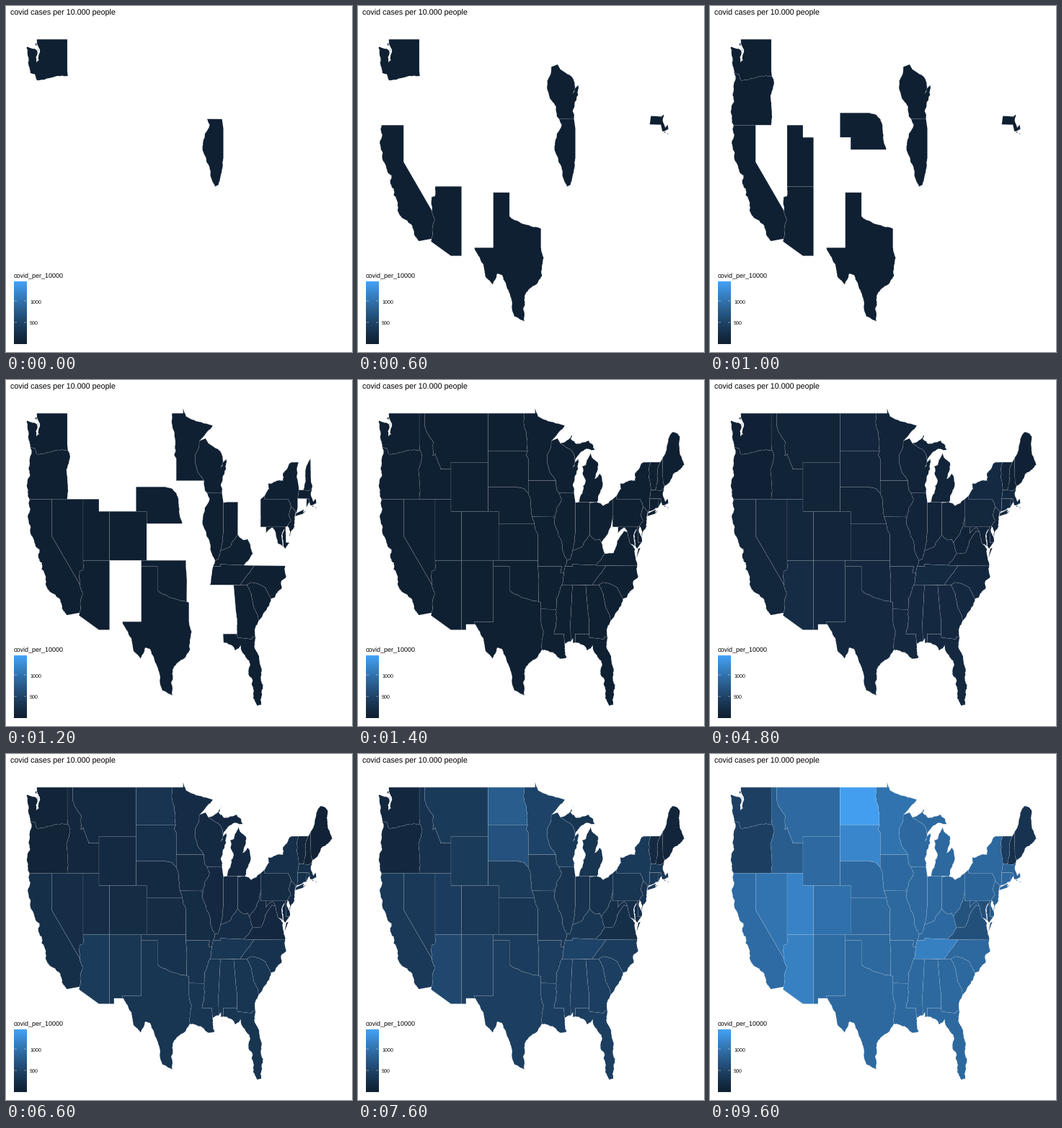
Write a matplotlib script that moves like this. It is 480 px wide and 480 px high and loops after 10000 ms.

```python
import numpy as np
import matplotlib.pyplot as plt
from matplotlib.animation import FuncAnimation
from matplotlib.collections import PolyCollection
from matplotlib.colors import LinearSegmentedColormap

SIZE, FRAMES, STEP = 480, 100, 100
TOP_VALUE = 1457
PX = 0.72  # points per pixel at 100 dpi

rng = np.random.default_rng(4)
ramp = LinearSegmentedColormap.from_list("blues", ["#102033", "#44a2f5"], gamma=1.2)


# ---- outlines -------------------------------------------------------------

def line(*v):
    """Degrees west and north in pairs -> pixel path."""
    p = np.array(v, float).reshape(-1, 2)
    return np.column_stack((944.1 - 7.34 * p[:, 0], 46.2 + 17 * (49 - p[:, 1])))


def split(a, b, bend):
    """Midpoint displacement between two points, without the first one."""
    d = b - a
    if np.hypot(*d) < 2.6:
        return [b]
    mid = (a + b) / 2 + np.array((-d[1], d[0])) * rng.uniform(-bend, bend)
    return split(a, mid, bend) + split(mid, b, bend)


def river(*v, bend=0.08):
    p = line(*v)
    return np.array([p[0]] + [q for a, b in zip(p, p[1:]) for q in split(a, b, bend)])


def coast(*v):
    return river(*v, bend=0.14)


def box(west, east, south, north):
    return line(west, north, east, north, east, south, west, south)


def gap(a, b):
    return np.hypot(*(a - b))


def ring(first, *rest):
    """Chain paths end to end, turning each one the right way round."""
    if rest:
        ends = rest[0][0], rest[0][-1]
        if min(gap(first[0], e) for e in ends) < min(gap(first[-1], e) for e in ends):
            first = first[::-1]
    parts = [first]
    for p in rest:
        tip = parts[-1][-1]
        parts.append(p[::-1] if gap(p[-1], tip) < gap(p[0], tip) else p)
    return np.vstack(parts)


polys, owner, starts, centers = [], [], [], []


def state(start, *paths, extra=()):
    outline = ring(*paths)
    for p in (outline, *extra):
        polys.append(p)
        owner.append(len(starts))
    starts.append(start)
    centers.append((outline.min(0) + outline.max(0)) / 2)


# Pacific and mountains
wa_sea = coast(122.76, 49, 122.5, 48.4, 122.2, 48, 122.4, 47.3, 122.9, 47.1, 122.65, 47.9,
               122.8, 48.12, 124.7, 48.38, 124.35, 47.4, 124.05, 46.27)
wa_or = river(124.05, 46.27, 123.2, 46.15, 122.75, 45.65, 121.5, 45.7, 119.6, 45.92, 118.98, 46, 116.92, 46)
or_id = river(116.92, 46, 116.5, 45.5, 117.2, 44.4, 117.03, 43.8, 117.03, 42)
or_sea = coast(124.05, 46.27, 124.1, 44, 124.55, 42.84, 124.2, 42)
ca_sea = coast(124.2, 42, 124.15, 41, 124.4, 40.4, 123.75, 39, 122.95, 38.1, 122.3, 37.9, 122.5, 37.2,
               121.85, 36.8, 121.9, 36.3, 120.65, 34.6, 119.3, 34.2, 118.4, 33.8, 117.12, 32.53)
ca_az = river(114.72, 32.72, 114.6, 33.4, 114.15, 34.3, 114.63, 35)
nv_az = river(114.63, 35, 114.75, 36.1, 114.05, 36.2, 114.05, 37)
id_mt = river(116.05, 48, 114.35, 46.65, 114.5, 45.55, 113.95, 45.7, 113, 44.45, 111.05, 44.47)
# Plains
nd_mn = river(97.23, 49, 96.85, 47.5, 96.56, 45.94)
sd_mn = line(96.56, 45.94, 96.85, 45.6, 96.45, 45.3, 96.45, 43.5)
sd_ne = river(96.45, 42.5, 97.2, 42.85, 98.5, 43)
ia_ne = river(96.45, 42.5, 95.85, 41.2, 95.77, 40.58)
ne_mo = river(95.77, 40.58, 95.3, 40)
ks_mo = line(95.3, 40, 95.1, 39.5, 94.6, 39.1, 94.62, 37)
red = river(94.48, 33.64, 96.6, 33.85, 98.1, 34.1, 100, 34.56)
ok_ar = line(94.62, 36.5, 94.43, 35.4, 94.48, 33.64)
sabine = river(94.04, 32, 93.55, 31.2, 93.85, 29.7)
tx_sea = coast(93.85, 29.7, 95.3, 28.9, 97.2, 27.75, 97.4, 27, 97.15, 25.96)
rio = river(97.15, 25.96, 99.1, 26.4, 99.5, 27.5, 100.7, 29.1, 101.4, 29.77, 102.3, 29.88, 103.2, 28.98,
            104.5, 29.6, 104.9, 30.6, 106.53, 31.78)
# Lakes and the Mississippi
mn_top = river(95.15, 49.38, 94.6, 48.75, 92, 48.3, 89.55, 48, 92.1, 46.75)
mn_wi = river(92.1, 46.75, 92.3, 46.1, 92.87, 45.6, 92.75, 44.75, 91.22, 43.5)
ia_wi = river(91.22, 43.5, 91.05, 42.7, 90.64, 42.5)
ia_il = river(90.64, 42.5, 90.15, 42, 91.05, 41.3, 91.42, 40.38)
ia_mo = line(91.42, 40.38, 91.72, 40.6, 95.77, 40.58)
il_mo = river(91.42, 40.38, 91.5, 40, 90.7, 38.95, 90.2, 38.6, 89.5, 37.3, 89.13, 36.98)
ky_mo = river(89.13, 36.98, 89.5, 36.5)
tn_mo = river(89.5, 36.5, 89.7, 36)
mo_ar = line(89.7, 36, 90.37, 36, 90.1, 36.5, 94.62, 36.5)
ar_tn = river(89.7, 36, 90.1, 35)
ar_ms = river(90.1, 35, 91.1, 33.9, 91.17, 33)
la_ms = river(91.17, 33, 91.1, 32.2, 91.6, 31)
wi_mi = river(90.4, 46.57, 88.1, 45.9, 87.6, 45.1)
wi_lake = coast(87.6, 45.1, 88, 44.55, 87, 45.3, 87.7, 43.7, 87.8, 42.49)
mi_up = coast(90.4, 46.57, 87.8, 47.47, 88.4, 46.9, 87.4, 46.5, 85, 46.77, 83.9, 46, 86.3, 45.9, 87.6, 45.1)
mi_low = coast(83.45, 41.73, 82.42, 43, 83, 44.07, 83.9, 43.65, 83.3, 45, 84.75, 45.77, 85.55, 44.8,
               86.25, 44.7, 86.2, 42.5, 86.82, 41.76)
# Ohio valley and the South
il_in = river(88.05, 37.8, 87.53, 39.3)
il_ky = river(89.13, 36.98, 88.5, 37.1, 88.05, 37.8)
in_ky = river(88.05, 37.8, 86.3, 38.1, 85.4, 38.73, 84.82, 39.1)
oh_ky = river(84.82, 39.1, 83.7, 38.65, 82.9, 38.75, 82.6, 38.42)
oh_wv = river(80.52, 40.64, 80.85, 39.7, 81.75, 38.95, 82.6, 38.42)
oh_lake = coast(83.45, 41.73, 82.3, 41.45, 80.52, 41.98)
ky_wv = river(82.6, 38.42, 81.97, 37.54)
ky_va = river(81.97, 37.54, 83.68, 36.6)
tn_top = line(89.5, 36.5, 88.05, 36.5, 88.05, 36.68, 83.68, 36.6)
tn_nc = river(81.7, 36.58, 83.1, 35.75, 84.32, 34.99)
wv_va = river(77.72, 39.32, 78.35, 39.4, 79.65, 38.58, 80.3, 37.6, 81.97, 37.54)
potomac = river(79.48, 39.2, 78.3, 39.68, 77.72, 39.32)
md_va = river(77.28, 38.4, 77.72, 39.32)
va_sea = coast(75.87, 36.55, 76.3, 37.5, 76.25, 37.9, 77.28, 38.4)
md_sea = coast(75.05, 38.45, 75.85, 37.95, 76.25, 38.5, 76, 39.55, 76.5, 38.9, 76.35, 38.1, 77.28, 38.4)
nc_sea = coast(75.87, 36.55, 75.7, 35.6, 76.6, 35.3, 76.5, 34.7, 77.9, 33.95, 78.55, 33.86)
nc_sc = line(83.1, 35, 82.3, 35.2, 81.05, 35.1, 79.67, 34.8, 78.55, 33.86)
sc_sea = coast(78.55, 33.86, 79.3, 33.1, 80.9, 32.05)
ga_sc = river(83.1, 35, 81.95, 33.45, 80.9, 32.05)
ga_sea = coast(80.9, 32.05, 81.45, 30.7)
ga_fl = line(85, 31, 84.86, 30.7, 82.2, 30.57, 82, 30.75, 81.45, 30.7)
al_ga = river(85.18, 32.87, 85, 32.3, 85, 31)
al_fl = line(85, 31, 87.6, 31, 87.5, 30.3)
al_ms = line(88.2, 35, 88.1, 34.9, 88.47, 31.9, 88.4, 30.37)
al_sea = line(87.5, 30.3, 88, 30.25, 88, 30.65, 88.4, 30.37)
fl_sea = coast(81.45, 30.7, 80.55, 28.45, 80.03, 26.8, 80.4, 25.2, 81.1, 25.13, 81.9, 26.5, 82.8, 27.9,
               82.65, 28.8, 84.2, 30.1, 85.3, 29.65, 87.5, 30.3)
ms_sea = coast(88.4, 30.37, 89.55, 30.2)
la_sea = coast(89.55, 30.2, 89.5, 29.7, 89.2, 29.05, 90.9, 29.1, 91.8, 29.5, 93.85, 29.7)
# Northeast
ny_lake = coast(79.76, 42.27, 78.9, 42.85, 79.05, 43.27, 76.3, 43.5, 76.3, 44.1, 74.7, 45)
ny_vt = river(73.34, 45.01, 73.27, 42.75)
ny_ct = line(73.5, 42.05, 73.5, 41.3, 73.65, 41)
ny_nj = line(74, 40.7, 73.9, 41, 74.7, 41.36)
ny_pa = river(75.35, 42, 74.7, 41.36)
nj_pa = river(74.7, 41.36, 75.2, 40.7, 74.75, 40.2, 75.4, 39.8)
nj_sea = coast(74, 40.7, 74.1, 39.75, 74.95, 38.95, 75.4, 39.8)
de_sea = coast(75.4, 39.8, 75.55, 39.4, 75.05, 38.45)
ct_ri = line(71.8, 42.02, 71.85, 41.32)
ct_sea = coast(71.85, 41.32, 73.65, 41)
ma_ri = line(71.38, 42.02, 71.12, 41.5)
ri_sea = line(71.12, 41.5, 71.35, 41.75, 71.85, 41.32)
ma_sea = coast(70.82, 42.87, 71, 42.3, 70.5, 41.78, 70.1, 42.05, 69.97, 41.65, 71.12, 41.5)
vt_nh = river(71.5, 45.01, 72.05, 44.1, 72.46, 42.73)
nh_me = line(71.08, 45.3, 70.98, 43.4, 70.7, 43.07)
me_top = river(71.08, 45.3, 70.3, 46.2, 69.23, 47.46, 68.3, 47.36, 67.79, 47.07, 67.79, 45.7, 66.97, 44.8)
me_sea = coast(66.97, 44.8, 69.1, 44, 70.7, 43.07)

# Second of first appearance, then the outline
state(0, wa_sea, wa_or, line(117.04, 46.42, 117.04, 49),
      extra=[line(123.15, 48.6, 122.85, 48.7, 122.85, 48.45), line(122.7, 48.3, 122.4, 47.95, 122.6, 48.1)])
state(0, ia_il, il_mo, il_ky, il_in, line(87.53, 41.7, 87.8, 42.49))
state(.2, ca_sea, ca_az, line(120, 39, 120, 42))
state(.2, ca_az, nv_az, line(109.05, 37, 109.05, 31.33, 111.07, 31.33, 114.82, 32.5))
state(.4, line(73.27, 42.75, 71.3, 42.7, 70.82, 42.87), ma_sea, ma_ri, line(73.5, 42.05),
      extra=[line(70.8, 41.4, 70.6, 41.47, 70.45, 41.36), line(70.2, 41.3, 70, 41.33, 70, 41.24)])
state(.4, mn_wi, ia_wi, wi_lake, wi_mi, line(90.9, 46.95))
state(.6, line(103.05, 36.5, 100, 36.5), red, line(94.04, 33.55, 94.04, 32), sabine, tx_sea, rio,
      line(106.62, 32, 103.05, 32))
state(.8, line(104.05, 43, 98.5, 43), sd_ne, ia_ne, ne_mo, line(102.05, 40, 102.05, 41, 104.05, 41))
state(1, line(114.05, 42, 111.05, 42, 111.05, 41, 109.05, 41, 109.05, 37, 114.05, 37))
state(1, wa_or, or_id, or_sea)
state(1.2, line(120, 42, 114.05, 42), nv_az, line(120, 39))
state(1.2, box(109.05, 102.05, 37, 41))
state(1.2, line(103.05, 37, 94.62, 37), ok_ar, red, line(100, 36.5, 103.05, 36.5))
state(1.2, line(97.23, 49, 95.15, 49), mn_top, mn_wi, sd_mn, nd_mn)
state(1.2, il_in, line(87.53, 41.7, 86.82, 41.76, 84.8, 41.76), in_ky)
state(1.2, il_ky, in_ky, oh_ky, ky_wv, ky_va, tn_top, ky_mo)
state(1.2, tn_top, tn_nc, line(90.1, 35), ar_tn, tn_mo)
state(1.2, tn_nc, nc_sc, nc_sea)
state(1.2, nc_sc, sc_sea, ga_sc)
state(1.2, line(85.6, 34.98, 83.1, 35), ga_sc, ga_sea, ga_fl, al_ga)
state(1.2, al_fl, ga_fl, fl_sea)
state(1.2, ny_lake, ny_vt, line(73.5, 42.05), ny_ct, ny_nj, ny_pa, line(79.76, 42),
      extra=[line(74, 40.6, 73.75, 40.85, 72.3, 41.15, 72.5, 40.9, 71.9, 41.07, 72.5, 40.8)])
state(1.2, line(80.52, 41.98, 79.76, 42.27, 79.76, 42, 75.35, 42), ny_pa, nj_pa,
      line(75.79, 39.72, 80.52, 39.72))
state(1.2, ny_nj, nj_pa, nj_sea)
state(1.2, potomac, line(79.48, 39.72, 75.79, 39.72, 75.7, 38.46, 75.05, 38.45), md_sea, md_va)
state(1.2, vt_nh, line(71.3, 42.7, 70.82, 42.87), nh_me)
state(1.2, ma_ri, ri_sea, ct_ri)
state(1.4, line(117.04, 49, 116.05, 49), id_mt, line(111.05, 42), or_id, line(117.04, 46.42))
state(1.4, line(104.05, 49, 116.05, 49), id_mt, line(111.05, 45, 104.05, 45))
state(1.4, box(111.05, 104.05, 41, 45))
state(1.4, line(104.05, 45.94, 104.05, 49, 97.23, 49), nd_mn)
state(1.4, line(104.05, 43, 104.05, 45.94, 96.56, 45.94), sd_mn, sd_ne)
state(1.4, line(102.05, 37, 102.05, 40, 95.3, 40), ks_mo)
state(1.4, line(96.45, 43.5, 91.22, 43.5), ia_wi, ia_il, ia_mo, ia_ne)
state(1.4, ia_mo, il_mo, ky_mo, tn_mo, mo_ar, ks_mo, ne_mo)
state(1.4, mo_ar, ok_ar, line(94.04, 33.55, 94.04, 33.02, 91.17, 33), ar_ms, ar_tn)
state(1.4, line(94.04, 32, 94.04, 33.02, 91.17, 33), la_ms, line(89.75, 31), la_sea, sabine)
state(1.4, ar_ms, la_ms, line(89.75, 31), ms_sea, al_ms)
state(1.4, line(88.2, 35, 85.6, 34.98), al_ga, al_fl, al_sea, al_ms)
state(1.4, line(86.82, 41.76, 84.8, 41.76, 83.45, 41.73), mi_low, extra=[ring(wi_mi, mi_up)])
state(1.4, line(84.8, 41.7, 83.45, 41.73), oh_lake, oh_wv, oh_ky)
state(1.4, wv_va, ky_va, line(81.7, 36.58, 75.87, 36.55), va_sea, md_va,
      extra=[line(75.25, 38.03, 75.65, 37.95, 76, 37.2)])
state(1.4, ny_vt, line(72.46, 42.73), vt_nh)
state(1.4, nh_me, me_top, me_sea)
state(1.4, line(73.5, 42.05, 71.8, 42.02), ct_ri, ct_sea, ny_ct)
state(1.4, de_sea, line(75.7, 38.46, 75.79, 39.72))
state(1.4, line(109.05, 37, 103.05, 37, 103.05, 32, 106.62, 32, 106.53, 31.78, 108.2, 31.78,
                108.2, 31.33, 109.05, 31.33))
state(1.6, oh_wv, line(80.52, 39.72, 79.48, 39.72), potomac, wv_va, ky_wv)

owner, starts = np.array(owner), np.array(starts)
cx, cy = np.array(centers).T


# ---- cases: smooth fields over the map, arriving in four waves ------------

def bump(x, y, radius):
    return np.exp(-((cx - x) ** 2 + (cy - y) ** 2) / radius ** 2)


def ease(t, begin, end):
    u = np.clip((t - begin) / (end - begin), 0, 1)
    return u * u * (3 - 2 * u)


total = (900
         + 730 * bump(208, 93, 36)     # Dakotas
         + 330 * bump(125, 225, 38)    # Utah
         + 230 * bump(123, 300, 30)    # Arizona
         + 240 * bump(316, 270, 22)    # Tennessee
         - 800 * bump(57, 102, 36)     # Northwest
         - 900 * bump(424, 118, 25)    # New England
         - 300 * bump(368, 225, 32))   # Virginia
spring = 0.02 + 0.14 * bump(400, 155, 42)
summer = 0.14 + 0.18 * np.clip((cy - 200) / 100, 0, 1)
autumn = 0.10 + 0.45 * bump(210, 100, 80)
winter = 1 - spring - summer - autumn


def cases(t):
    return total * (spring * ease(t, 1.3, 2.8) + summer * ease(t, 3.3, 6.4)
                    + autumn * ease(t, 6.1, 8.5) + winter * ease(t, 7, 9.7))


# ---- page -----------------------------------------------------------------

plt.rcParams.update({"font.family": "Liberation Sans", "text.hinting": "none"})
fig = plt.figure(figsize=(4.8, 4.8), dpi=100, facecolor="white")
ax = fig.add_axes((0, 0, 1, 1))
ax.axis("off")

left, right, top, base = 11, 28.3, 382.3, 468.7
ax.imshow(np.linspace(1, 0, 256)[:, None], cmap=ramp, aspect="auto", extent=(left, right, base, top))
for value in (500, 1000):
    y = base - (base - top) * value / TOP_VALUE
    for x in (left, right - 3.5):
        ax.plot((x, x + 3.5), (y, y), color="white", lw=0.4 * PX, solid_capstyle="butt")
    ax.text(33, y + 0.5, str(value), size=7.2 * PX, va="center_baseline")
ax.text(6.5, 13, "covid cases per 10.000 people", size=10.8 * PX)
ax.text(11, 377, "covid_per_10000", size=9 * PX)

land = PolyCollection(polys, edgecolors="white", linewidths=0.1 * PX, snap=False)
ax.add_collection(land)
ax.set(xlim=(0, SIZE), ylim=(SIZE, 0))


def draw(i):
    t = i * STEP / 1000
    rgba = ramp(cases(t) / TOP_VALUE)
    rgba[:, 3] = starts <= t + 1e-6
    land.set_facecolor(rgba[owner])
    return land,


anim = FuncAnimation(fig, draw, frames=FRAMES, interval=STEP, repeat=True, repeat_delay=0)
plt.show()
```
